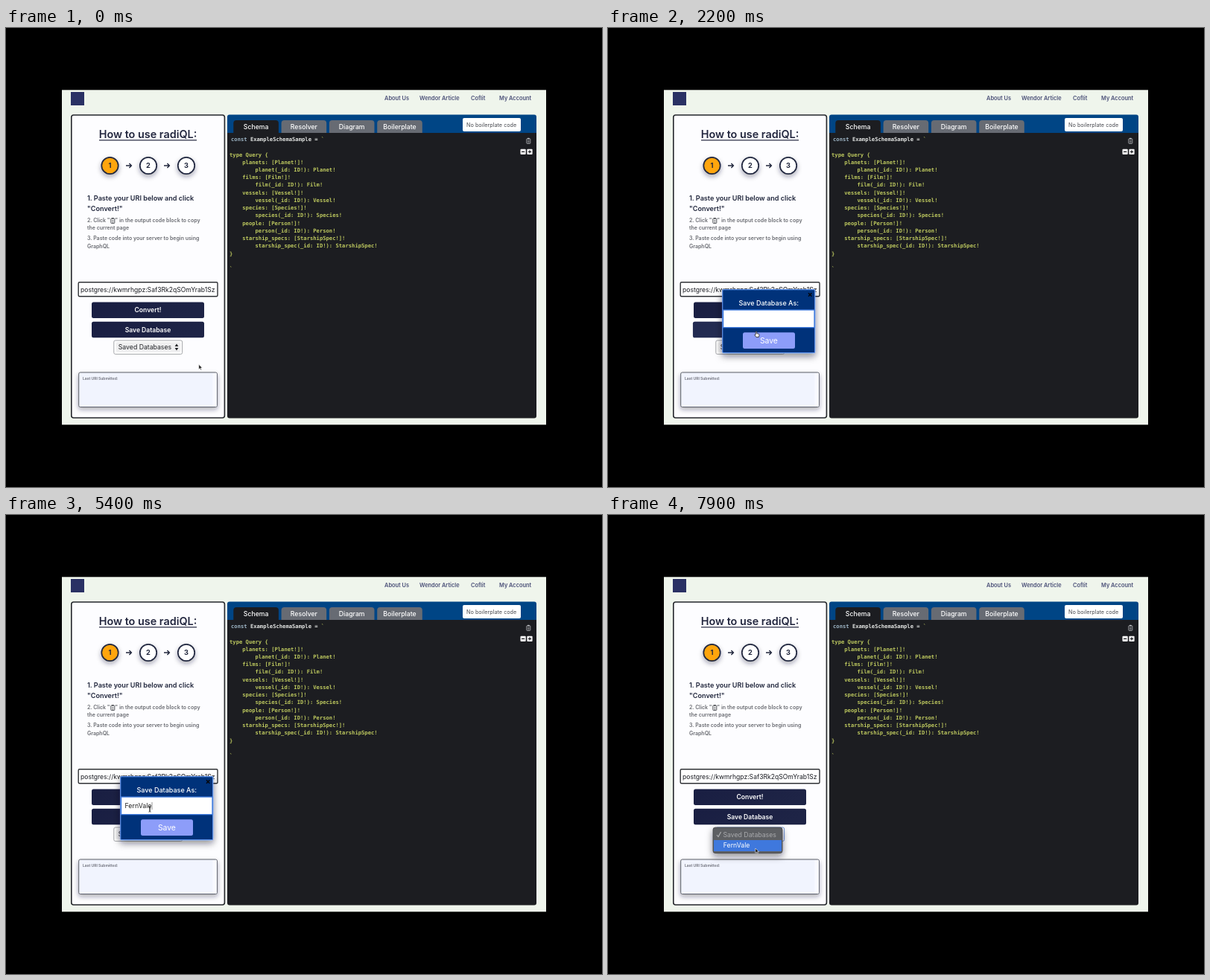
An HTML page for the animation above (8 s loop, 800 px wide and 617 px high).

```html
<!DOCTYPE html>
<html lang="en">
<head>
<meta charset="utf-8">
<title>Save a database</title>
<style>
  html, body { margin: 0; width: 100%; height: 100%; overflow: hidden; background: #000; }
  svg { display: block; width: 100vw; height: 100vh; }
  text { font-family: Inter, "Open Sans", sans-serif; white-space: pre; }
  .code text { font: bold 7.18px "DejaVu Sans Mono", monospace; fill: #bcc75e; }
  .pop { transform-box: fill-box; transform-origin: center; }
</style>
</head>
<body>
<svg id="stage" viewBox="0 0 800 617" xmlns="http://www.w3.org/2000/svg"></svg>
<script>
const LOOP = 8000, STEP = 100;
const DB_NAME = "FernVale";
const NAVY = "#1e2446";

const rect = (x, y, w, h, fill, r = 0, more = "") =>
  `<rect x="${x}" y="${y}" width="${w}" height="${h}" rx="${r}" fill="${fill}" ${more}/>`;
const text = (s, x, y, size, fill, weight = 400, more = "") =>
  `<text x="${x}" y="${y}" font-size="${size}" fill="${fill}" font-weight="${weight}" ${more}>${s}</text>`;
const mid = (s, x, y, size, fill, weight, more = "") =>
  text(s, x, y, size, fill, weight, `text-anchor="middle" ${more}`);
const line = (d, color, w = 1) =>
  `<path d="${d}" fill="none" stroke="${color}" stroke-width="${w}"/>`;
const group = (id, body, more = "") => `<g id="${id}" ${more}>${body}</g>`;

const clip = (x, y, color, w) =>
  rect(x, y + 1, 5, 6.5, "none", .7, `stroke="${color}" stroke-width="${w}"`) +
  rect(x + 1.2, y, 2.6, 1.8, color, .4) +
  line(`M${x + 1.2} ${y + 3.6}h2.6m-2.6 1.3h2.6m-2.6 1.3h2.6`, color, .6);

const header = () =>
  rect(87, 86, 18, 18, "#2a3164") +
  [["About Us", 508], ["Wendor Article", 555], ["Coflit", 624], ["My Account", 662]]
    .map(([s, x]) => text(s, x, 96.8, 7.4, "#4b5078", 600)).join("");

const steps = () => [139.5, 191, 242].map((x, i) =>
  `<circle cx="${x}" cy="185" r="11.2" fill="${i ? "#fff" : "#ffa50a"}" stroke="#20283f" stroke-width="1.7" filter="url(#soft)"/>` +
  mid(i + 1, x, 188.3, 9.2, "#20263c", 700)).join("") +
  [165, 216].map(x => line(`M${x - 4} 185h7.4m-3-3l3 3l-3 3`, "#20263c", 1.4)).join("");

const guide = () => {
  const lead = (s, y) => text(s, 109, y, 9.1, "#20263c", 600);
  const note = (s, y, x = 109) => text(s, x, y, 7, "#686a70", 600);
  return lead("1. Paste your URI below and click", 232.2) + lead('"Convert!"', 246) +
    note('2. Click "', 261.4) + clip(140.8, 255, "#55575c", 1) +
    note('" in the output code block to copy', 261.4, 146.6) +
    note("the current page", 271.4) +
    note("3. Paste code into your server to begin using", 285.4) + note("GraphQL", 295.6);
};

const panel = () =>
  rect(87.8, 117, 205.6, 407, "#fdfdff", 3, 'stroke="#25272c" stroke-width="1.6"') +
  mid("How to use radiQL:", 190.5, 148.2, 14.4, "#23273f", 600) +
  rect(125, 150.2, 131, 1.2, "#23273f") + steps() + guide() +
  rect(97.2, 341.7, 186.8, 19, "#fff", 1.5, 'stroke="#303236" stroke-width="1.4"') +
  text("postgres://kwmrhgpz:Saf3Rk2qSOmYrab1Sz", 100, 354.7, 8.6, "#181a20") +
  rect(115, 368.5, 151, 21.5, "url(#navy)", 2.5) +
  mid("Convert!", 190.5, 382.4, 8.6, "#fff", 600) +
  group("save", rect(115, 394.8, 151, 21.4, "url(#navy)", 2.5) +
    `<rect id="glow" x="115" y="394.8" width="151" height="21.4" rx="2.5" fill="#404d7c"/>` +
    mid("Save Database", 190.5, 408.6, 8.55, "#fff", 600, 'id="saveText"'), 'class="pop"') +
  rect(144.8, 420, 91.8, 18.4, "#fff", 2, 'id="select" stroke="#a5a7ab" stroke-width="1"') +
  rect(147.5, 422.3, 87, 13.8, "#efeff0", 2) +
  text("Saved Databases", 150.8, 432.4, 8.7, "#202226") +
  '<path d="M226.6 428l2.4-3.4l2.4 3.4zm0 2l2.4 3.4l2.4-3.4z" fill="#202226"/>' +
  rect(97.7, 463, 185.7, 46.5, "#f1f4fe", 2, 'stroke="#5d6068" stroke-width="1" filter="url(#soft)"') +
  rect(277.4, 464, 5.4, 44.5, "#f8f9ff") +
  text("Last URI Submitted:", 103, 472.8, 5, "#6c6e78", 600);

const schema = () => {
  const kinds = [["planet", "Planet"], ["film", "Film"], ["vessel", "Vessel"],
    ["species", "Species"], ["person", "Person"], ["starship_spec", "StarshipSpec"]];
  const plural = { species: "species", person: "people" };
  const rows = ["type Query {"];
  for (const [one, type] of kinds) {
    rows.push(`    ${plural[one] || one + "s"}: [${type}!]!`,
      `        ${one}(_id: ID!): ${type}!`);
  }
  rows.push("}", "", "`");
  return '<g class="code">' +
    '<text x="302" y="152"><tspan fill="#9db4c4">const</tspan><tspan fill="#e4e6e4"> ExampleSchemaSample = </tspan>`</text>' +
    rows.map((s, i) => `<text x="300" y="${172.5 + i * 10.24}">${s}</text>`).join("") + "</g>";
};

const editor = () =>
  rect(297, 116.5, 415, 40, "#004585", 3) + rect(297, 145, 415, 379.5, "#1c1d21", 3) +
  rect(297, 141, 415, 8, "#1c1d21") +
  ["Schema", "Resolver", "Diagram", "Boilerplate"].map((s, i) => {
    const x = 305.3 + i * 64.3;
    return `<path d="M${x} 141v-13q0-4 4-4h52.6q4 0 4 4v13z" fill="${i ? "#676b73" : "#1c1d21"}"/>` +
      mid(s, x + 30.3, 136.2, 8.7, "#fff", 500);
  }).join("") +
  rect(613, 121, 78, 18, "#fff", 2) + mid("No boilerplate code", 651.7, 132.6, 7.25, "#484a50") +
  clip(698.8, 147.8, "#b9bbbf", .8) +
  rect(690.5, 162.8, 7.2, 7.2, "#fff", 1) + rect(699.4, 162.8, 7.2, 7.2, "#fff", 1) +
  line("M692 166.4h4.2m4.7 0h4.2m-2.1-2.1v4.2", "#1c1d21", 1.2) + schema();

const modal = () => group("modal",
  rect(153.7, 351.7, 124, 85, "#00337a", 1.5, 'stroke="#5f92ea" stroke-width="1.2" filter="url(#deep)"') +
  line("M269 356.2l4.4 4.6m0-4.6l-4.4 4.6", "#06080e", 1.5) +
  mid("Save Database As:", 215.8, 373.4, 9, "#fff", 500) +
  rect(154.6, 379, 122.4, 23.6, "#fff", 0, 'stroke="#3c78dc" stroke-width="1.3"') +
  text("", 159.5, 394.2, 8.8, "#222", 400, 'id="typed"') +
  rect(159.6, 386, .8, 10, "#333", 0, 'id="caret"') +
  group("ok", rect(181, 409.3, 70, 21.6, "#8d9df9", 2.5) + mid("Save", 215.9, 424, 10.4, "#fff"), 'class="pop"'));

const menu = () => group("menu",
  rect(141, 420, 93, 34.5, "#5d5f63", 3, 'stroke="#404246" stroke-width=".8" filter="url(#deep)"') +
  line("M146 430l2 2.5l3.6-6.6", "#b0b1b4", 1.1) +
  text("Saved Databases", 154.5, 432.6, 8.7, "#a9aaad") +
  rect(142, 437, 91, 15, "#3f78dd", 0, 'id="pick"') + text(DB_NAME, 154.8, 447.2, 8.7, "#fff"));

// Each pointer is drawn with its hot spot at 0,0.
const pointers = () => group("pointer",
  group("arrow", '<path d="M0 0v6.4l1.5-1.3l1 2.3l1.1-.5l-1-2.2h2z" fill="#111" stroke="#fff" stroke-width=".6"/>') +
  group("hand", '<path d="M-.7 .3q.8-1 1.5 0v2.5l2.5.6q.9.3.8 1.2l-.6 3h-3.6l-2-3q.3-1 1.4-.1z" fill="#fff" stroke="#222" stroke-width=".8"/>') +
  group("beam", line("M-1.5-3.7q1.5 0 1.5 1v5.4q0 1-1.5 1m3-7.4q-1.5 0-1.5 1v5.4q0 1 1.5 1", "#222", .8)));

document.getElementById("stage").innerHTML = `<defs>
  <linearGradient id="navy" x1="0" x2="1" y2=".3"><stop stop-color="#191e42"/><stop offset="1" stop-color="${NAVY}"/></linearGradient>
  <filter id="soft" x="-40%" y="-40%" width="180%" height="200%"><feDropShadow dx="0" dy="3" stdDeviation="3" flood-color="#223" flood-opacity=".36"/></filter>
  <filter id="deep" x="-30%" y="-30%" width="160%" height="170%"><feDropShadow dx="0" dy="4" stdDeviation="5" flood-color="#112" flood-opacity=".5"/></filter>
  </defs>` + rect(75, 83.3, 650, 450, "#eff5ec") + header() + panel() + editor() + modal() + menu() + pointers();

const $ = id => document.getElementById(id);
const ease = u => u * u * (3 - 2 * u);

// Rows are [time, value, ...]; values glide between rows and hold outside them.
function track(rows, t) {
  const next = rows.findIndex(r => r[0] > t);
  if (next < 1) return rows.at(next).slice(1);
  const a = rows[next - 1], b = rows[next];
  const u = ease((t - a[0]) / (b[0] - a[0]));
  return a.slice(1).map((v, k) => v + (b[k + 1] - v) * u);
}

const path = [[0, 258.8, 452.3], [700, 201, 412.2], [2000, 201, 412.2], [2600, 193, 395.5],
  [5400, 193, 395.5], [5800, 214, 418], [6600, 214, 418], [6900, 222.8, 434.5],
  [7200, 221, 430], [7900, 197.8, 448]];
const shapes = [[0, "arrow"], [600, "hand"], [2300, "beam"], [5700, "hand"], [6300, "arrow"]];
const hover = [[500, 0], [700, 1], [2000, 1], [2300, 0]];
const grow = [[800, 1], [1400, 1.09], [1900, 1.09], [2300, 1]];
const fade = [[1700, 0], [2200, 1], [5900, 1], [6400, 0]];
const blink = [[2600, 0], [2800, .7], [2900, .7], [3300, 0], [3500, 0], [4000, 1], [5200, 1], [5700, 0]];
const okGrow = [[5600, 1], [5800, 1.06], [6000, 1.06], [6300, 1]];
const keys = [4300, 4400, 4500, 4600, 4700, 4800, 4900, 5100];

const scaleAt = (s, x, y) => `translate(${x} ${y}) scale(${s}) translate(${-x} ${-y})`;

function draw(t) {
  const [x, y] = track(path, t);
  $("pointer").setAttribute("transform", `translate(${x} ${y})`);
  const shape = shapes.filter(s => s[0] <= t).pop()[1];
  for (const id of ["arrow", "hand", "beam"]) $(id).style.display = id === shape ? "" : "none";

  const [h] = track(hover, t);
  $("glow").style.opacity = h;
  $("saveText").setAttribute("fill", h > .4 ? "#ffa51c" : "#fff");
  $("save").style.transform = `scale(${track(grow, t)[0]})`;

  const [f] = track(fade, t);
  $("modal").style.opacity = f;
  $("modal").style.display = f ? "" : "none";
  $("modal").setAttribute("transform", scaleAt(.95 + .05 * f, 215.7, 395));
  $("ok").style.transform = `scale(${track(okGrow, t)[0]})`;

  const n = keys.filter(k => k <= t).length;
  $("typed").textContent = DB_NAME.slice(0, n);
  $("caret").setAttribute("x", 159.6 + (n ? $("typed").getComputedTextLength() : 0));
  $("caret").style.opacity = track(blink, t)[0];

  $("menu").style.display = t >= 7300 ? "" : "none";
  $("pick").style.opacity = t >= 7600 ? 1 : 0;
  $("select").setAttribute("stroke", t >= 7300 ? "#6f93d8" : "#a5a7ab");
}

const start = performance.now();
function tick() {
  const t = (performance.now() - start) % LOOP;
  draw(Math.floor(t / STEP) * STEP);
  requestAnimationFrame(tick);
}
draw(0);
requestAnimationFrame(tick);
</script>
</body>
</html>
```
